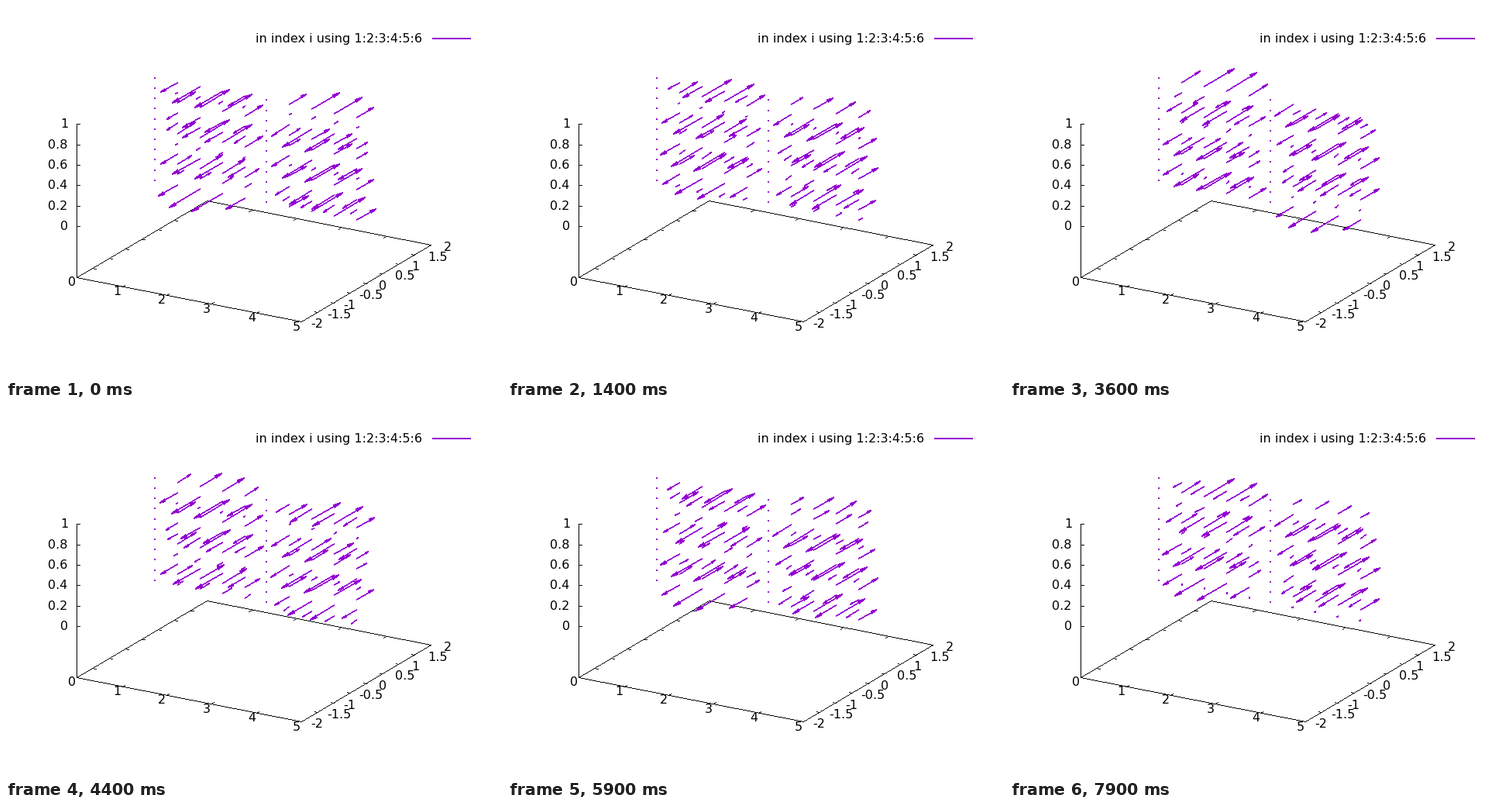
Write a matplotlib script that moves like this. It is 640 by 480 pixels and loops after 8 s.

```python
import numpy as np
import matplotlib.pyplot as plt
from matplotlib.animation import FuncAnimation
from matplotlib.collections import PolyCollection

W, H, DPI = 640, 480, 100
FRAMES, STEP_MS = 80, 100
VIOLET = "#9400d3"
K_Z = 19.33            # wave number along z
Y_PLANE = 0.4          # all arrows start on this plane
TICK = 4
HEAD_MIN, HEAD_MAX = 1.5, 10
FONT = dict(family="DejaVu Sans", size=16 * 72 / DPI, color="black",
            ha="left", va="baseline")

X_DIR = np.array([57.94, 11.43])
Y_DIR = np.array([41.86, -24.75])
Z_DIR = np.array([0.0, -132.0])
CORNER = np.array([91.665, 349.7])   # x = 0, y = -2, z = -0.5


def project(x, y, z=-0.5):
    return CORNER + x * X_DIR + (y + 2) * Y_DIR + (z + 0.5) * Z_DIR


def pixel(p):
    return np.array([np.floor(p[0]), np.ceil(p[1])])


def bar(p, q, w):
    """Staircase outline of a hard-edged pixel line from p to q."""
    d = np.abs(q - p)
    a, b = (0, 1) if d[0] >= d[1] else (1, 0)
    if p[a] > q[a]:
        p, q = q, p
    n = int(q[a] - p[a])
    slope = (q[b] - p[b]) / n if n else 0
    low = np.floor(p[b] + slope * np.arange(n + 1) + 0.5) - w // 2
    u = np.repeat(p[a] + np.arange(n + 2), 2)[1:-1]
    v = np.repeat(low, 2)
    out = np.empty((2 * len(u), 2))
    out[:, a] = np.concatenate([u, u[::-1]])
    out[:, b] = np.concatenate([v, v[::-1] + w])
    return out


def dot(p):
    return p + np.array([(-1, -1), (1, -1), (1, 1), (-1, 1)])


def arrow(tail, tip):
    back = tail - tip
    length = np.hypot(*back)
    if length == 0:
        return [dot(tail)]
    scale = max(HEAD_MIN / length, min(0.3, HEAD_MAX / length))
    parts = [bar(tail, tip, 2)]
    for angle in np.radians([10, -10]):
        c, s = np.cos(angle), np.sin(angle)
        barb = np.array([c * back[0] - s * back[1], s * back[0] + c * back[1]])
        parts.append(bar(tip, tip + np.trunc(scale * barb), 2))
    return parts


def field(t):
    parts = []
    for x in np.arange(10) * 0.5:
        mode = np.sin(2 * np.pi * x / 5)
        for z in np.arange(11) * 0.1:
            v = np.round(-mode * np.cos(t - K_Z * z), 9)
            parts += arrow(pixel(project(x, Y_PLANE, z)),
                           pixel(project(x, Y_PLANE + v, z)))
    return parts


fig = plt.figure(figsize=(W / DPI, H / DPI), dpi=DPI, facecolor="white")
ax = fig.add_axes([0, 0, 1, 1])
ax.set_xlim(0, W)
ax.set_ylim(H, 0)
ax.axis("off")


def polys(parts, color, z):
    pc = PolyCollection(parts, facecolors=color, edgecolors="none",
                        linewidths=0, zorder=z)
    pc.set_snap(False)
    return ax.add_collection(pc, autolim=False)


def label(p, dx, dy, s):
    x, y = pixel(p + np.array([dx, dy]))
    ax.text(x, y, s, zorder=3, **FONT)


def tick(p, direction):
    u = direction / np.hypot(*direction) * TICK
    frame.append(bar(pixel(p), pixel(p + u), 1))


# Base plane and vertical axis
base = [pixel(project(x, y)) for x, y in ((0, -2), (5, -2), (5, 2), (0, 2))]
frame = [bar(base[i], base[(i + 1) % 4], 1) for i in range(4)]
frame.append(bar(base[0], pixel(project(0, -2, 1)), 1))

for x in range(6):
    p = project(x, -2)
    if 0 < x < 5:
        tick(p, Y_DIR)
        tick(project(x, 2), -Y_DIR)
    label(p, -11.3, 11.2, str(x))

for y in np.arange(-2, 2.1, 0.5):
    p = project(5, y)
    if abs(y) < 2:
        tick(p, -X_DIR)
        tick(project(0, y), X_DIR)
    label(p, 11.8 if y < 0 else 16.8, 8, f"{y:g}")

for i in range(6):
    p = project(0, -2, i / 5)
    tick(p, np.array([1.0, 0.0]))
    s = f"{i / 5:g}"
    label(p, -21.5 if len(s) == 1 else -37.5, 5, s)

polys(frame, "black", 1)

# Key
label(np.array([322, 47]), 0, 0, "in index i using 1:2:3:4:5:6")
polys([bar(np.array([550, 42]), np.array([599, 42]), 2)], VIOLET, 2)

arrows = polys(field(0), VIOLET, 2)


def update(i):
    arrows.set_verts(field(i * STEP_MS / 1000))
    return (arrows,)


anim = FuncAnimation(fig, update, frames=FRAMES, interval=STEP_MS,
                     init_func=lambda: update(0), repeat=True, repeat_delay=0)
plt.show()
```
